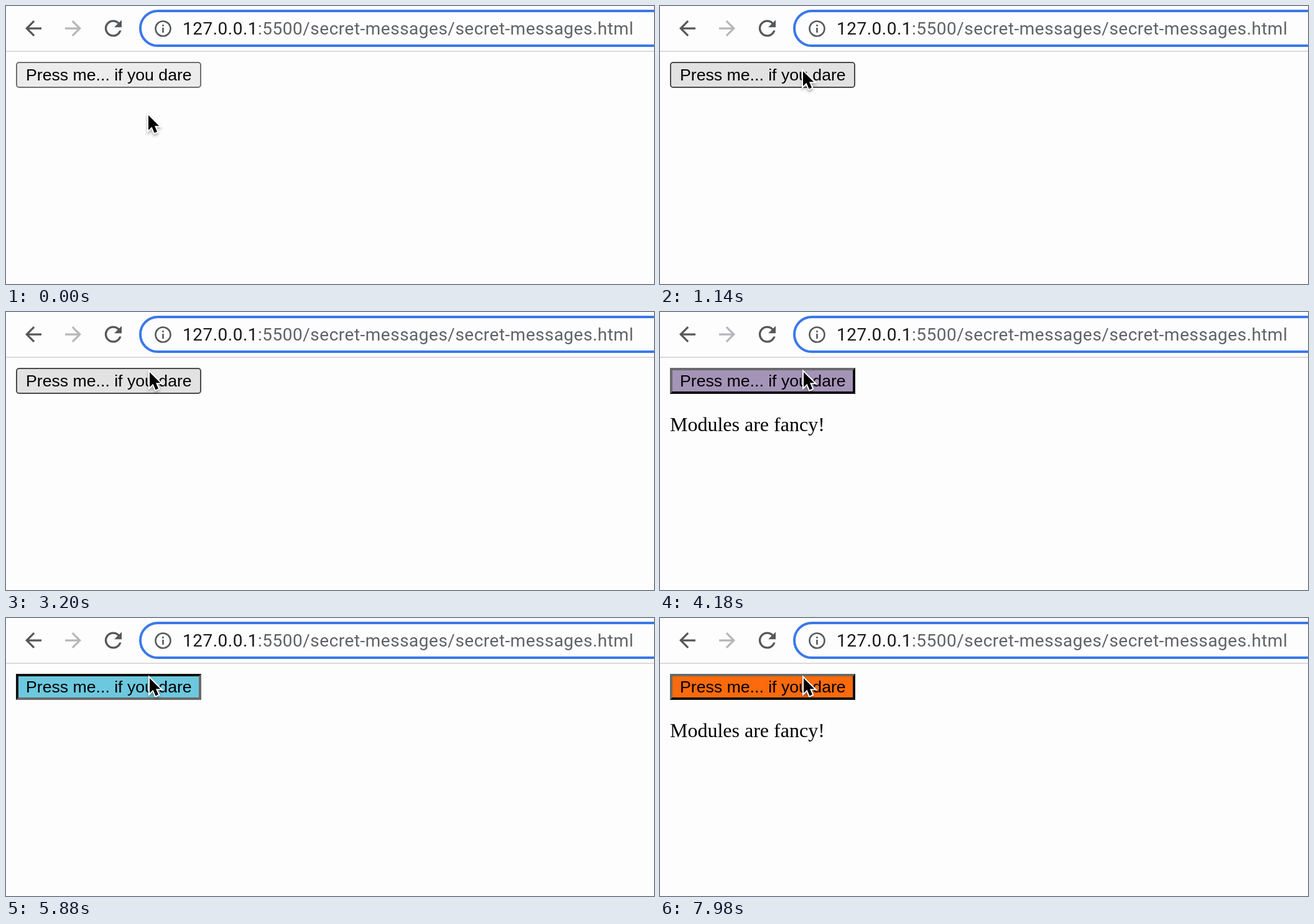
Recreate the animation shown at these times as an HTML page. Size 1042 by 448 pixels, loop 8 s.

```html
<!DOCTYPE html>
<html lang="en">
<head>
<meta charset="utf-8">
<title>Secret messages</title>
<style>
  html, body { margin: 0; width: 100%; height: 100%; overflow: hidden; background: #fdfdfd; }
  svg { position: absolute; left: 0; top: 0; width: 1042px; height: 448px; }

  .button {
    position: absolute; left: 16px; top: 90px; width: 298px; height: 42px;
    box-sizing: border-box; border: 2px solid #6f6f6f; border-radius: 5px;
    background: #ececec;
    animation: button 8s step-end infinite;
  }
  .url { font: 28px Roboto, Inter, sans-serif; letter-spacing: .5px; fill: #5f6266; }
  .host { fill: #18191b; }
  .label { font: 26.667px "Liberation Sans", Arial, sans-serif; }
  .message {
    font: 32px "Liberation Serif", Times, serif;
    animation: message 8s step-end infinite;
  }
  .cursor {
    filter: drop-shadow(0 3px 2px rgba(0, 0, 0, .3));
    animation: cursor 8s linear infinite;
  }

  /* Hover, then five clicks: each press insets the border, each release recolours */
  @keyframes button {
    0% { background: #ececec; border: 2px solid #6f6f6f; border-radius: 5px; }
    7.5% { background: #e2e2e2; border: 2px solid #4a4a4a; border-radius: 5px; }
    42.25% { background: #f3f3f3; border: 2px solid #858585; border-radius: 5px; }
    43.75% { background: #a494b8; border: 4px solid; border-color: #6a6a6a #101010 #101010 #6a6a6a; border-radius: 0; }
    56.5% { background: #a494b8; border: 4px solid; border-color: #101010 #6a6a6a #6a6a6a #101010; border-radius: 0; }
    58% { background: #6cc8de; border: 4px solid; border-color: #6a6a6a #101010 #101010 #6a6a6a; border-radius: 0; }
    71.5% { background: #6cc8de; border: 4px solid; border-color: #101010 #6a6a6a #6a6a6a #101010; border-radius: 0; }
    73.75% { background: #a09c90; border: 4px solid; border-color: #6a6a6a #101010 #101010 #6a6a6a; border-radius: 0; }
    80.5% { background: #a09c90; border: 4px solid; border-color: #101010 #6a6a6a #6a6a6a #101010; border-radius: 0; }
    81.75% { background: #557783; border: 4px solid; border-color: #606060 #101010 #101010 #606060; border-radius: 0; }
    92.75% { background: #557783; border: 4px solid; border-color: #101010 #606060 #606060 #101010; border-radius: 0; }
    95.25%, 100% { background: #fb6a0c; border: 4px solid; border-color: #6a6a6a #101010 #101010 #6a6a6a; border-radius: 0; }
  }
  @keyframes message {
    0%, 58%, 81.75% { visibility: hidden; }
    43.75%, 73.75%, 95.25%, 100% { visibility: visible; }
  }
  @keyframes cursor {
    0% { transform: translate(229px, 176px); animation-timing-function: ease-in-out; }
    2.75% { transform: translate(229px, 180px); animation-timing-function: ease-in-out; }
    10.25% { transform: translate(230px, 109px); animation-timing-function: ease-out; }
    14.25% { transform: translate(230px, 105px); animation-timing-function: ease-in-out; }
    19% { transform: translate(231px, 98px); }
    40% { transform: translate(231px, 97px); }
    100% { transform: translate(231px, 97px); }
  }
</style>
</head>
<body>
<div class="button"></div>
<svg viewBox="0 0 1042 448">
  <defs>
    <path id="arrow" d="M20 11H7.83l5.59-5.59L12 4l-8 8 8 8 1.41-1.41L7.83 13H20z"/>
  </defs>

  <!-- Toolbar -->
  <rect y="72" width="1042" height="2" fill="#dadada"/>
  <use href="#arrow" transform="translate(24.5 16.5) scale(1.625)" fill="#55585b"/>
  <use href="#arrow" transform="translate(127.5 16.5) scale(-1.625 1.625)" fill="#b6b7b9"/>
  <path transform="translate(152 15.6) scale(1.7)" fill="#55585b"
    d="M17.65 6.35C16.2 4.9 14.21 4 12 4c-4.42 0-7.99 3.58-7.99 8s3.57 8 7.99 8c3.73 0 6.84-2.55 7.73-6h-2.08c-.82 2.33-3.04 4-5.65 4-3.31 0-6-2.69-6-6s2.69-6 6-6c1.66 0 3.14.69 4.22 1.78L13 11h7V4z"/>
  <rect x="216" y="8" width="900" height="56" rx="28" fill="none" stroke="#3a78ea" stroke-width="4"/>
  <g fill="none" stroke="#55585b" stroke-width="2.6">
    <circle cx="252.5" cy="36.5" r="12"/>
    <path d="M252.5 35v8M252.5 30v2.7"/>
  </g>
  <text class="url" x="284" y="46"><tspan class="host">127.0.0.1</tspan>:5500/secret-messages/secret-messages.html</text>

  <!-- Page -->
  <text class="label" x="32" y="120">Press me... if you dare</text>
  <text class="message" x="16" y="192">Modules are fancy!</text>
  <path class="cursor" d="M0 0V24L5.5 18.8 9.6 28.4 14 26.5 10 17.2H17.2Z"
    stroke="#fff" stroke-width="4" paint-order="stroke"/>
</svg>
</body>
</html>
```
